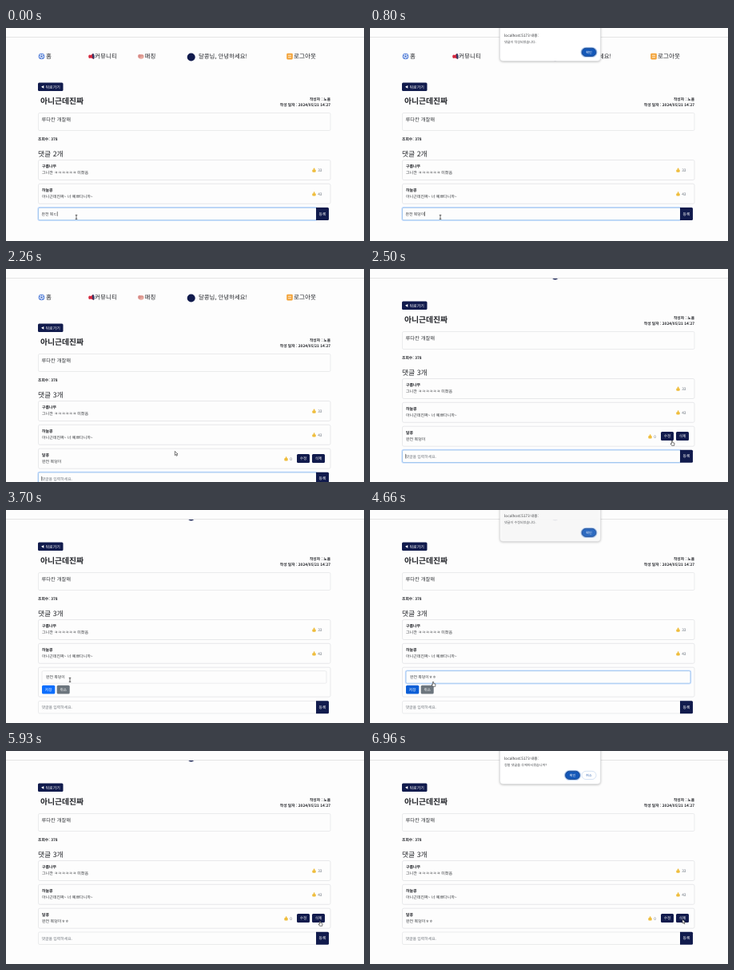
Write an HTML page with a canvas that moves like this. It is 448 px wide and 267 px high and loops after 7 s.

```html
<!DOCTYPE html>
<html lang="ko">
<head>
<meta charset="utf-8">
<style>
html, body { margin: 0; width: 100%; height: 100%; overflow: hidden; background: #fdfdfd; }
canvas { display: block; width: 448px; height: 267px; }
</style>
</head>
<body>
<canvas id="stage"></canvas>
<script>
const W = 448, H = 267, LOOP = 7000;
const NAVY = '#111b4d', INK = '#222429', LINE = '#e3e4e6', PAGE = '#fdfdfd';
const FONT = '"Noto Sans CJK KR", "Noto Sans KR", "Noto Sans CJK JP", "Noto Sans", sans-serif';

const canvas = document.getElementById('stage');
const ctx = canvas.getContext('2d');
const dpr = window.devicePixelRatio || 1;
canvas.width = W * dpr;
canvas.height = H * dpr;

// Times of the user's actions, in ms
const T = { posted: 2080, scroll: 2270, edit: 3010, focus: 3740, save: 4560, saved: 5270 };

const typing = [[0, '완전 복ㄷ'], [100, '완전 복더'], [200, '완전 복덩'], [320, '완전 복덩ㅇ'], [420, '완전 복덩이']];
const editing = [[0, '완전 복덩이'], [3960, '완전 복덩이ㅎ'], [4100, '완전 복덩이ㅎㅎ']];

const dialogs = [
  { from: 570, to: 2030, text: '댓글이 작성되었습니다.' },
  { from: T.save, to: 5230, text: '댓글이 수정되었습니다.' },
  { from: 6730, to: LOOP + 500, text: '정말 댓글을 삭제하시겠습니까?', cancel: true }
];

// time, x, y
const mousePath = [
  [0, 88, 237], [2090, 88, 237], [2470, 378, 217], [3080, 378, 217], [3620, 80, 213],
  [4180, 80, 213], [4420, 79, 217], [5330, 79, 217], [5820, 393, 215],
  [6680, 393, 215], [6800, 391, 211], [LOOP, 391, 211]
];

const clamp = v => Math.max(0, Math.min(1, v));
const ease = p => p * p * (3 - 2 * p);
const stepAt = (steps, t) => steps.filter(s => s[0] <= t).pop()[1];

function text(str, x, y, size, color = INK, weight = 400, align = 'left') {
  ctx.font = `${weight} ${size}px ${FONT}`;
  ctx.textAlign = align;
  ctx.fillStyle = color;
  ctx.fillText(str, x, y + size * 0.37);
  return ctx.measureText(str).width;
}

function box(x, y, w, h, r, fill, stroke, width = 0.7) {
  ctx.beginPath();
  ctx.roundRect(x, y, w, h, r);
  if (fill) { ctx.fillStyle = fill; ctx.fill(); }
  if (stroke) { ctx.strokeStyle = stroke; ctx.lineWidth = width; ctx.stroke(); }
}

function oval(x, y, rx, ry, fill, turn = 0) {
  ctx.beginPath();
  ctx.ellipse(x, y, rx, ry, turn, 0, Math.PI * 2);
  ctx.fillStyle = fill;
  ctx.fill();
}

function shape(points, fill, stroke, width = 0.7) {
  ctx.beginPath();
  points.forEach(([x, y]) => ctx.lineTo(x, y));
  ctx.closePath();
  ctx.fillStyle = fill;
  ctx.fill();
  if (stroke) { ctx.strokeStyle = stroke; ctx.lineWidth = width; ctx.stroke(); }
}

function button(label, x, y, w, h, fill, size = 4.7) {
  box(x, y, w, h, 1.5, fill);
  text(label, x + w / 2, y + h / 2, size, '#fff', 400, 'center');
}

function field(x, y, w, h, focused) {
  if (focused) box(x, y, w, h, 1.5, null, '#cfe2ff', 2.4);
  box(x, y, w, h, 1.5, PAGE, focused ? '#86b7e8' : LINE);
}

function caret(x, y) {
  ctx.fillStyle = '#222';
  ctx.fillRect(x, y - 2.8, 0.6, 5.6);
}

function nav() {
  oval(44.5, 35.5, 3.8, 3.8, '#4a78d8');
  oval(44.5, 35.5, 2.9, 2.9, '#e8effc');
  for (let i = 0; i < 5; i++) {
    const a = i * Math.PI * 0.4 - Math.PI / 2;
    oval(44.5 + 2.5 * Math.cos(a), 35.5 + 2.5 * Math.sin(a), 0.8, 0.8, '#4a78d8');
  }
  oval(44.5, 35.5, 1.1, 1.1, '#3560bd');
  text('홈', 50, 35.3, 7.5, INK, 500);

  oval(104.8, 35.8, 1.6, 2.3, '#d5283f');
  shape([[105.5, 34.5], [108.8, 32], [109.8, 39], [105.8, 37.2]], '#d5283f');
  oval(109.3, 35.5, 1.3, 3.4, '#343a65', -0.1);
  text('커뮤니티', 111, 35.3, 7.6, INK, 500);

  oval(169, 35.7, 3.6, 3, '#e9aaa0');
  box(165.4, 33.2, 3, 4, 1, '#d98c88');
  box(168, 34.5, 4, 0.7, 0.3, '#c77f7a');
  text('매칭', 173.5, 35.3, 7.5, INK, 500);

  oval(231.7, 36.5, 5, 5, NAVY);
  text('달콩님, 안녕하세요!', 241, 35.3, 7.4, INK, 500);

  box(351.2, 31.8, 7.6, 7.6, 1.3, '#f3a43b');
  box(353, 33.8, 4, 1, 0.3, '#fff3df');
  box(353, 36.3, 4, 1, 0.3, '#fff3df');
  text('로그아웃', 360, 35.3, 7.6, INK, 500);
}

function post(count) {
  box(40, 68.5, 31.5, 10.5, 1.5, NAVY);
  shape([[44, 73.8], [47.3, 71.9], [47.3, 75.7]], '#fff');
  text('뒤로가기', 49.5, 73.7, 5, '#fff');
  text('아니근데진짜', 43, 91.6, 9.8, INK, 700);
  text('작성자 : 노을', 406, 89.3, 4.75, INK, 600, 'right');
  text('작성 일자 : 2024/05/21 14:27', 406, 96, 4.75, INK, 600, 'right');
  box(40.5, 106.5, 365.5, 22, 1.5, null, LINE);
  text('루다칸 개잘해', 44.5, 115, 6.3, '#33363a');
  text('조회수: 378', 40, 139, 4.8, INK, 700);
  text(`댓글 ${count}개`, 40, 158, 8.8, INK);
}

function likes(n, x, y) {
  box(x - 2.2, y - 0.8, 4.4, 3.3, 1, '#efbd3c');
  box(x - 0.7, y - 2.7, 1.6, 3, 0.7, '#efbd3c');
  text(String(n), x + 4.7, y, 4.8, '#68717c');
}

function card(y, h) {
  box(40.5, y, 365.5, h, 1.8, null, '#dfe0e3');
}

function comment(y, name, body, n, own) {
  card(y, 25);
  text(name, 45, y + 7.8, 4.9, INK, 600);
  text(body, 45, y + 15.8, 5, '#33363a');
  likes(n, own ? 350.5 : 385.5, y + 12.7);
  if (own) {
    button('수정', 364, y + 6.9, 16, 10.8, NAVY);
    button('삭제', 383, y + 6.9, 16, 10.8, NAVY);
  }
}

function editor(y, t) {
  const focused = t >= T.focus;
  const str = stepAt(editing, t);
  card(y, 37);
  field(45, y + 4.5, 356, 15.5, focused);
  const w = text(str, 50, y + 12.2, 4.9, '#33363a');
  if (focused && t < T.save) caret(50.3 + w, y + 12.2);
  button('저장', 45, y + 22.5, 16.3, 10.7, t > 4390 ? '#0b5ed7' : '#0d6efd');
  button('취소', 63.7, y + 22.5, 16, 10.7, '#6c757d');
}

function entry(y, t) {
  const focused = t < T.edit;
  field(40.5, y, 348, 15.5, focused);
  box(388, y - 0.3, 16, 16, [0, 1.5, 1.5, 0], NAVY);
  text('등록', 396, y + 7.7, 4.8, '#fff', 400, 'center');
  let w = 0;
  if (t < T.posted) w = text(stepAt(typing, t), 44.5, y + 7.7, 4.9, '#33363a');
  else text('댓글을 입력하세요.', 44.5, y + 7.7, 4.9, '#70767d');
  if (focused) caret(44.5 + w, y + 7.7);
}

function page(t) {
  const posted = t >= T.posted;
  const edit = t >= T.edit && t < T.saved;
  ctx.save();
  ctx.beginPath();
  ctx.rect(0, 11.5, W, H);
  ctx.clip();
  ctx.translate(0, -28 * ease(clamp((t - T.scroll) / 160)));
  nav();
  post(posted ? 3 : 2);
  comment(165.5, '구름나무', '그니깐 ㅋㅋㅋㅋㅋㅋ 미쳤음', 33);
  comment(195.3, '하늘콩', '아니근데진짜~ 너 예쁘다니까~', 43);
  if (edit) editor(225.2, t);
  else if (posted) comment(225.2, '달콩', stepAt(editing, t), 0, true);
  entry(edit ? 267.5 : posted ? 255 : 225.3, t);
  ctx.restore();
  ctx.fillStyle = '#e4e4e5';
  ctx.fillRect(0, 11, W, 1);
}

function pill(label, x, main) {
  if (main) {
    box(x - 0.9, 24.5, 19.8, 11.8, 5.9, null, '#a9c6ee', 1.1);
    box(x, 25.3, 18, 10.2, 5.1, '#1458b8', '#123f86', 0.8);
  } else box(x, 25.3, 18, 10.2, 5.1, '#fff', '#c5d7f0');
  text(label, x + 9, 30.3, 4.1, main ? '#fff' : '#3b6bb5', 400, 'center');
}

function dialog(d, t) {
  const p = clamp((t - d.from) / 150);
  const out = clamp((t - d.to) / 90);
  if (p <= 0 || out >= 1) return;
  ctx.save();
  ctx.globalAlpha = (1 - (1 - p) ** 2) * (1 - out);
  ctx.translate(0, -6 * (1 - p));
  ctx.shadowColor = 'rgba(0,0,0,0.3)';
  ctx.shadowBlur = 3 * dpr;
  ctx.shadowOffsetY = 0.7 * dpr;
  box(162.5, -10, 126, 51.5, 4, '#fff');
  ctx.shadowColor = 'transparent';
  box(162.5, -10, 126, 51.5, 4, null, '#d9dadc', 0.6);
  text('localhost:5173 내용:', 168, 9.2, 4.7, '#2b2d30');
  text(d.text, 168, 17.4, 4.1, '#45484c');
  pill('확인', d.cancel ? 244.5 : 265, true);
  if (d.cancel) pill('취소', 265, false);
  ctx.restore();
}

function mouseAt(t) {
  const i = Math.max(1, mousePath.findIndex(k => k[0] > t));
  const [t0, x0, y0] = mousePath[i - 1], [t1, x1, y1] = mousePath[i];
  const p = ease(clamp((t - t0) / (t1 - t0)));
  return [x0 + (x1 - x0) * p, y0 + (y1 - y0) * p];
}

function mouse(t) {
  const [x, y] = mouseAt(t);
  const beam = t < 2110 || (t > 3580 && t < 4290);
  const hand = (t > 2440 && t < 3090) || (t >= 4290 && t < T.save + 120) || (t > 5790 && t < 6740);
  ctx.save();
  ctx.translate(x, y);
  if (beam) {
    ctx.fillStyle = '#222';
    ctx.fillRect(-0.35, -2.8, 0.7, 5.6);
    ctx.fillRect(-1.3, -3, 2.6, 0.6);
    ctx.fillRect(-1.3, 2.4, 2.6, 0.6);
  } else if (hand) {
    shape([[-0.6, -1.5], [0.6, -1.5], [0.7, 0.6], [3, 1.2], [2.7, 4.3], [-0.4, 4.3], [-2, 1.9], [-0.6, 2]],
      '#fff', '#222', 0.6);
  } else {
    shape([[0, 0], [0, 5], [1.2, 4], [2.1, 5.8], [3, 5.4], [2.2, 3.6], [3.7, 3.5]], '#fff', '#222', 0.6);
  }
  ctx.restore();
}

function draw(t) {
  ctx.setTransform(dpr, 0, 0, dpr, 0, 0);
  ctx.textRendering = 'geometricPrecision';
  ctx.fillStyle = PAGE;
  ctx.fillRect(0, 0, W, H);
  page(t);
  dialogs.forEach(d => dialog(d, t));
  mouse(t);
}

const start = performance.now();
function tick() {
  draw((performance.now() - start) % LOOP);
  requestAnimationFrame(tick);
}
tick();
</script>
</body>
</html>
```
